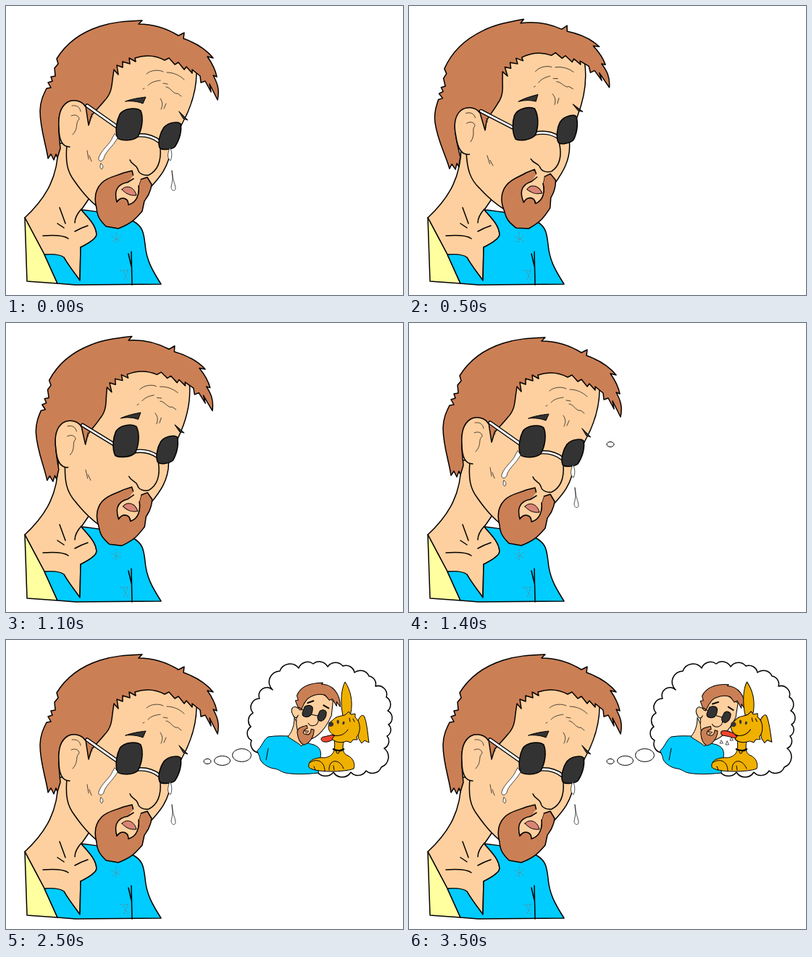
An HTML page for the animation above (3600 ms loop, 548 by 400 pixels).

```html
<!DOCTYPE html>
<html lang="en">
<head>
<meta charset="utf-8">
<title>Sad man thinking of his dog</title>
<style>
html, body { margin: 0; width: 100%; height: 100%; overflow: hidden; background: #fff; }
svg { display: block; width: 548px; height: 400px; }
path { stroke-linejoin: round; stroke-linecap: round; }
.ink { stroke: #000; stroke-width: 1.5; fill: none; }
.fine { stroke: #222; stroke-width: .8; fill: none; }
.small { stroke: #000; stroke-width: 1; fill: #fff; }
.line { fill: none; }
.skin { fill: #ffd09f; }
.hair { fill: #cb7f55; }
.blue { fill: #00ccff; }
.dark { fill: #333; }
.drop { fill: #fff; }
.dog { fill: #f0b000; }
</style>
</head>
<body>
<svg viewBox="0 0 548 400">
  <g class="ink">
    <path class="skin" d="M72 190C73 235 56 265 26 293L53 344L80 348C88 362 96 371 102 380L103 334C113 329 125 322 125 316C124 302 112 292 104 282L115 266L110 190Z"/>
    <path fill="#ffffa0" d="M26 293L29 381L71 384L53 344Z"/>
    <path class="blue" d="M53 344C65 343 75 344 80 348C88 362 96 371 102 380L103 334C113 329 125 322 125 316C124 302 112 292 104 282C120 284 160 288 176 298C188 305 190 312 192 330C194 355 205 370 214 385L96 386L71 384Z"/>
    <path d="M174 386L173 340M169 343L173 360M51 318C65 317 80 317 86 322M74 279L82 301M71 301L80 307M104 281C97 289 95 295 95 300M113 304C104 307 100 309 95 312"/>
    <path stroke="#777" stroke-width="1" stroke-dasharray="1 3" d="M146 319L158 325M148 326L158 318M152 314V327M162 368L168 379M168 366L163 379M158 366H169"/>
  </g>

  <g id="head" class="ink">
    <path class="skin" d="M84 192C82 215 84 229 95 243C104 256 112 266 124 276L150 300L190 262C200 248 226 230 227 196L243 163C254 143 263 118 263 92L220 60L150 70L110 130L74 150Z"/>
    <path class="hair" d="M66 213L62 205L58 211C55 190 47 170 47 145C47 132 52 122 56 114L62 113L58 106L64 104L62 98L68 97L67 86L72 80L70 73C84 50 105 36 130 28C148 22 165 21 188 20L183 25C205 25 225 33 238 41L246 37L245 45C262 51 277 61 286 72L278 70C285 80 289 88 291 98L286 96C292 107 295 116 292 130L281 108L283 119L275 104L269 106L268 97L262 92L257 88L257 93L249 84L246 88L238 78L233 81L225 72L219 75C204 67 190 68 178 72L179 77L170 72L171 80L161 77L161 85L153 82L155 95L149 88L147 102C146 112 145 122 136 131C128 141 121 147 118 152L114 165L110 139C100 129 80 133 74 152C71 165 74 185 75 197L71 210L69 205Z"/>
    <path class="hair" d="M125 280C121 265 124 253 132 245C141 236 151 236 162 231L174 228L177 240C164 246 149 251 153 271C159 263 169 265 169 275C180 272 184 260 183 249L186 240L195 237L201 247C199 261 194 266 191 270L188 284C179 294 175 300 155 308L138 305C129 296 126 291 125 280Z"/>
    <path class="skin" d="M110 140C105 130 92 129 85 133C74 140 72 155 73 168C73 185 78 195 88 195"/>
    <path class="fine" d="M91 138C98 137 102 140 103 146M90 152C97 149 101 153 101 157C95 161 101 169 92 178M112 200L114 212M115 207L118 215M118 149L119 154"/>
    <path class="skin" stroke="none" d="M177 233L168 244C150 247 150 260 153 271C159 263 169 265 169 275C181 272 184 260 183 249L186 240Z"/>
    <path d="M176 239L168 244C150 247 150 260 153 271C159 263 169 265 169 275C181 272 184 260 183 249"/>
    <path fill="#d98576" stroke-width="1" d="M160 254C166 247 177 250 180 262C170 263 165 259 160 254Z"/>
    <path d="M171 213C174 221 180 219 182 226C183 232 190 235 197 234C211 227 214 212 213 197"/>
    <path class="fine" d="M189 115L191 114M196 110C201 105 206 104 213 103M194 94C200 88 212 88 217 91M222 92C230 92 239 95 246 102M217 107L223 108M221 112C227 112 231 123 237 121L242 125M213 128C217 134 216 138 214 143M221 135L218 142"/>
    <path class="dark" stroke-width="1" d="M165 132C172 129 184 127 193 126L189 135C182 132 172 131 165 132ZM239 146L251 158L245 156Z"/>
    <g id="frame">
      <path stroke-width="5.5" d="M112 138L153 167M181 179C194 178 205 182 212 188"/>
      <path stroke="#fff" stroke-width="2.8" d="M112 138L153 167M181 179C194 178 205 182 212 188"/>
    </g>
    <path class="dark" d="M157 150C163 141 180 140 186 145C190 155 188 170 182 181C175 187 160 187 154 183C150 172 153 158 157 150ZM218 168C225 160 238 160 241 163C243 172 240 185 233 195C228 199 215 200 212 196C209 188 213 175 218 168Z"/>
  </g>
  <path id="tears" class="fine drop" d="M150 177L147 182C144 191 132 198 128 210C127 216 133 216 135 211C136 204 145 196 150 189L154 183ZM131 218C134 219 135 224 132 226C129 224 130 221 131 218ZM226 196C223 205 222 210 227 214C230 208 229 200 226 196ZM229 228C231 236 230 242 228 250C228 256 233 257 234 253C234 246 229 240 229 228Z"/>

  <g class="small">
    <ellipse class="puff" cx="278" cy="168" rx="5" ry="3.5"/>
    <ellipse class="puff" cx="298.5" cy="167" rx="11" ry="6.5"/>
    <ellipse class="puff" cx="325.5" cy="159.5" rx="13" ry="9"/>
    <g class="puff">
      <path stroke-width="1.5" d="M350 156A12 12 0 0 1 339 139A11 11 0 0 1 338 120A12 12 0 0 1 341 101A12 12 0 0 1 350 81A11 11 0 0 1 368 69A15 15 0 0 1 378 43A15 15 0 0 1 404 39A13 13 0 0 1 424 33A13 13 0 0 1 444 37A13 13 0 0 1 465 36A12 12 0 0 1 481 45A13 13 0 0 1 501 50A11 11 0 0 1 510 64A12 12 0 0 1 525 79A12 12 0 0 1 527 98A11 11 0 0 1 528 117A10 10 0 0 1 526 133A11 11 0 0 1 522 150A15 15 0 0 1 518 176A13 13 0 0 1 497 181A13 13 0 0 1 476 183A14 14 0 0 1 452 183A14 14 0 0 1 430 183H386Z"/>
      <path class="blue" d="M347 153C353 148 356 137 362 134C374 132 384 133 396 133C402 137 412 142 425 145C435 149 436 156 433 167L431 184C414 186 396 186 386 184C380 183 375 178 370 178C361 177 350 169 350 162Z"/>
      <path class="line" d="M362 150L359 166"/>
      <path class="skin" d="M398 108C398 120 394 128 389 134C398 140 404 143 408 147L414 138Z"/>
      <g id="man">
        <path class="skin" d="M405 84C403 98 398 110 402 124C405 134 411 139 417 138C430 136 442 121 449 104L451 84L430 70Z"/>
        <path class="hair" d="M404 96L399 84L403 83L401 77C406 64 420 59 437 59L435 61C450 61 461 73 461 92L456 85V91L450 81L446 83L440 76C430 73 420 77 415 82L411 88L407 97Z"/>
        <path class="skin" d="M404 95C396 88 391 96 396 104C398 109 402 108 403 104"/>
        <path class="hair" d="M402 129C401 122 407 120 415 118L416 122C408 125 410 131 413 130C419 133 421 127 421 123L425 124C425 134 419 143 411 145C405 142 403 136 402 129Z"/>
        <path fill="#d98576" stroke-width=".7" d="M412 125L418 126L415 129Z"/>
        <path class="line" d="M404 93L410 97M422 103L431 105M417 115C420 120 430 120 431 111"/>
        <path class="dark" d="M412 92C416 89 422 90 423 94C423 100 421 105 417 106C411 107 408 105 409 100ZM433 98C437 95 441 97 442 100C442 106 439 111 435 112C431 112 429 109 430 105Z"/>
        <path class="line" stroke-width="2" d="M416 87L424 84M438 90L445 94"/>
      </g>
      <path class="dog" d="M453 138L466 140C464 150 465 158 472 160C480 164 482 172 480 178C470 183 424 184 418 176C416 165 430 162 440 163C449 161 456 157 453 138Z"/>
      <path class="line" d="M419 170C428 163 440 167 440 181M446 180C445 165 460 163 466 178M425 175L427 180M452 174L453 180"/>
      <path class="line" stroke-width="2.5" d="M452 151C457 154 462 154 466 151"/>
      <circle class="dog" cx="458" cy="155" r="2"/>
      <g id="dogHead">
        <path class="dog" d="M465 105C461 85 463 67 468 58C476 70 479 85 476 101ZM484 118C486 108 491 102 494 105C498 112 499 128 501 142L495 139L491 143L487 137Z"/>
        <path id="tongue" fill="#f04430"/>
        <path class="dog" d="M452 110C457 104 465 106 469 103L473 99L476 103L482 102V107C490 113 490 128 484 134L485 138L479 138L476 142L470 140C463 143 455 142 450 137L454 132C447 130 443 122 446 115Z"/>
        <path class="line" d="M451 132C462 134 468 130 472 124M474 108L475 113M479 109L481 113"/>
        <path class="dark" stroke="none" d="M445 116C446 111 453 113 452 118C449 121 445 121 445 116ZM457 111C459 109 461 113 459 116C457 117 456 113 457 111ZM465 113C467 111 469 115 466 117C464 118 464 115 465 113Z"/>
      </g>
      <path id="drips" class="fine drop" d="M431 139L429 143H433ZM439 140L437 145H441ZM445 135L443 139H447Z"/>
    </g>
  </g>
</svg>
<script>
const $ = id => document.getElementById(id);
const puffs = document.querySelectorAll('.puff');
const STEP = 100, STEPS = 36;
const RISE = 6, REST = 13, FALL = 5, PUFF_START = 14;

const show = (el, visible) => el.style.display = visible ? '' : 'none';
const transform = (id, value) => $(id).setAttribute('transform', value);
// Cosine swing from 0 at the start to 1 half a period later.
const swing = (step, start, period) => .5 - .5 * Math.cos((step - start) * 2 * Math.PI / period);

// The head rises, holds, sinks back and stays down.
const headLift = step => Math.max(0, Math.min(step / RISE, 1, (REST - step) / FALL));

function tonguePath(lick) {
  const x = 436 - 4 * lick, y = 137 - 9 * lick;
  return `M455 131C448 131 444 ${y - 4} ${x + 3} ${y - 3}C${x - 3} ${y - 3} ${x - 2} ${y + 4} ${x + 4} ${y + 4}C445 ${y + 5} 451 138 456 135Z`;
}

function draw(step) {
  const lift = headLift(step);
  transform('head', `rotate(${-9.5 * lift} 160 233)`);
  show($('tears'), lift === 0);
  puffs.forEach((el, i) => show(el, step >= PUFF_START + i));

  const lick = swing(step, 25, 4), nod = swing(step, 22, 26);
  transform('man', `rotate(${nod * 3} 408 145) translate(0 ${nod})`);
  transform('dogHead', `rotate(${-lick} 462 150)`);
  $('tongue').setAttribute('d', tonguePath(lick));
  show($('drips'), lick > .4);
}

function tick(now) {
  draw(Math.floor(now / STEP) % STEPS);
  requestAnimationFrame(tick);
}
draw(0);
requestAnimationFrame(tick);
</script>
</body>
</html>
```
